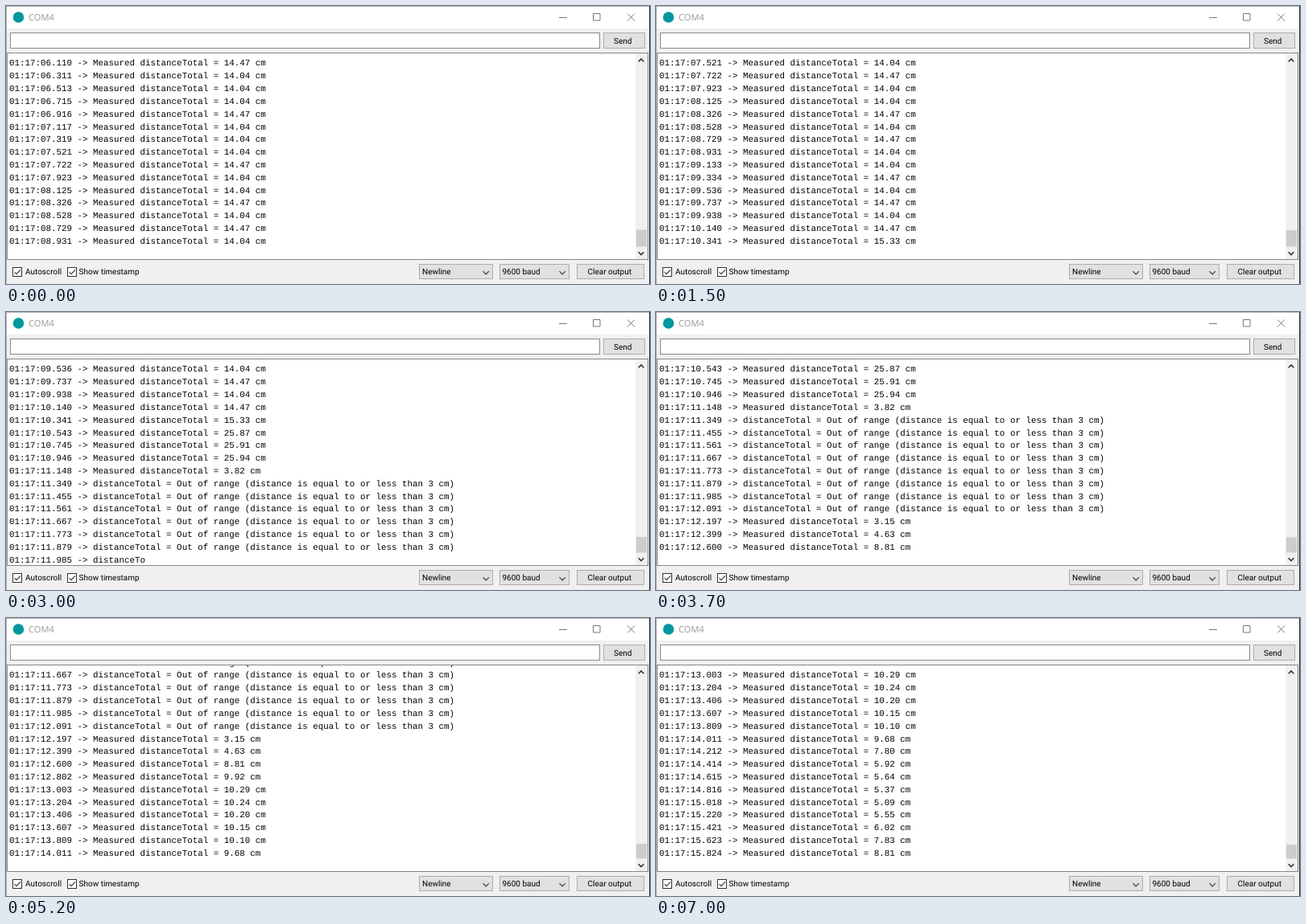
An HTML page that plays this animation: 800 px wide and 346 px high, repeating every 7.1 s.

```html
<!DOCTYPE html>
<html lang="en">
<head>
<meta charset="utf-8">
<title>Serial monitor</title>
<style>
  html, body { margin: 0; width: 100%; height: 100%; overflow: hidden; background: #f0f0f0; }
  svg { display: block; }
  text { font: 10px Roboto, "Noto Sans", sans-serif; fill: #000; text-rendering: geometricPrecision; white-space: pre; }
  #log text { font: 10.85px "Liberation Mono", "Courier New", monospace; }
  .title { font: 11.1px "Open Sans", sans-serif; fill: #999; }
  .button { fill: #e1e1e1; stroke: #adadad; }
  .box { fill: #fff; stroke: #333; }
  .icon { fill: none; stroke: #333; stroke-width: 1.1; }
</style>
</head>
<body>
<svg width="800" height="346" viewBox="0 0 800 346">
  <clipPath id="view"><rect x="2" y="59" width="780" height="256"/></clipPath>
  <rect width="800" height="346" fill="#f0f0f0"/>

  <rect width="800" height="28" fill="#fff"/>
  <circle cx="15.5" cy="14" r="6.8" fill="#00979d"/>
  <text class="title" x="28" y="18">COM4</text>
  <path class="icon" style="stroke:#777;stroke-width:1" d="M687 14.5H697M729.5 9.5h8.5v8.5h-8.5zM772 9.5l9 9m0-9l-9 9"/>

  <rect x="5.5" y="33.5" width="732" height="19" fill="#fff" stroke="#8a8a8a"/>
  <rect class="button" x="742.5" y="33.5" width="51" height="19"/>
  <text x="755" y="46.7">Send</text>

  <rect x="1.5" y="58.5" width="796" height="257" fill="#fff" stroke="#828790"/>
  <g id="log" clip-path="url(#view)"></g>
  <rect x="782" y="59" width="15" height="256" fill="#f0f0f0"/>
  <rect id="thumb" x="783" width="13" fill="#cdcdcd"/>
  <path class="icon" style="stroke-width:1.6" d="M785.7 69.3l3.3-3.3 3.3 3.3M785.7 306.2l3.3 3.3 3.3-3.3"/>

  <rect class="box" x="8.5" y="325.5" width="11" height="11"/>
  <rect class="box" x="76.5" y="325.5" width="11" height="11"/>
  <path class="icon" d="M10.5 331l2.5 2.7 5-5.4M78.5 331l2.5 2.7 5-5.4"/>
  <text x="24" y="334.3">Autoscroll</text>
  <text x="90.5" y="334.3">Show timestamp</text>

  <rect class="button" x="513.5" y="321.5" width="91" height="18"/>
  <rect class="button" x="613.5" y="321.5" width="86" height="18"/>
  <rect class="button" x="709.5" y="321.5" width="83" height="18"/>
  <text x="517" y="334.3">Newline</text>
  <text x="616.5" y="334.3">9600 baud</text>
  <text x="722.5" y="334.3">Clear output</text>
  <path class="icon" d="M592.5 330.2l3.7 3.7 3.7-3.7M687.5 330.2l3.7 3.7 3.7-3.7"/>

  <path d="M0 .5H800M.5 0V346" stroke="#b4b4b4"/>
  <rect x="799" width="1" height="346" fill="#2b2b2b"/>
</svg>
<script>
const LOOP = 7100, STEP = 100, CLOCK_START = 8996;
const CHARS_PER_MS = 0.96; // 9600 baud
const ROWS = 17, PITCH = 15.82, LAST_BASELINE = 295.9;
const THUMB_BOTTOM = 299.5;

const READINGS = 53, FIRST_AT = 6110, MEASURED_GAP = 201.5, NEAR_GAP = 106, MIN_CM = 3;

// How the obstacle moves: [reading, cm], straight lines between.
const path = [
  [20, 14.47], [21, 15.33], [22, 25.87], [24, 25.94], [25, 3.82], [26, 2.9], [33, 2.9],
  [34, 3.15], [35, 4.63], [36, 8.81], [37, 9.92], [38, 10.29], [42, 10.1], [43, 9.68],
  [45, 5.92], [48, 5.09], [50, 6.02], [51, 7.83], [52, 8.81],
];

// At rest the echo flips up once per beat, and the beats come faster.
const beat = i => Math.floor(0.162 * i ** 1.25 + 0.1);
const resting = i => i === 0 || beat(i) > beat(i - 1) ? 14.47 : 14.04;

function distance(i) {
  if (i < path[0][0]) return resting(i);
  const k = Math.max(1, path.findIndex(([index]) => index >= i));
  const [i0, cm0] = path[k - 1], [i1, cm1] = path[k];
  return cm0 + (cm1 - cm0) * (i - i0) / (i1 - i0);
}

const lines = [];
for (let i = 0, at = FIRST_AT; i < READINGS; i++) {
  const cm = distance(i), near = cm <= MIN_CM;
  lines.push({
    at,
    prefix: `01:17:${(at / 1000).toFixed(3).padStart(6, "0")} -> `,
    message: near ? `distanceTotal = Out of range (distance is equal to or less than ${MIN_CM} cm)`
                  : `Measured distanceTotal = ${cm.toFixed(2)} cm`,
  });
  at += near ? NEAR_GAP : MEASURED_GAP;
}

const log = document.getElementById("log");
const thumb = document.getElementById("thumb");
const rows = Array.from({ length: ROWS }, (_, i) => {
  const row = document.createElementNS("http://www.w3.org/2000/svg", "text");
  row.setAttribute("x", 3.9);
  row.setAttribute("y", LAST_BASELINE + (i - ROWS + 2) * PITCH);
  return log.appendChild(row);
});

function draw(time) {
  const clock = CLOCK_START + time;
  const complete = [];
  let partial = "";
  for (const { at, prefix, message } of lines) {
    const sent = Math.floor((clock - at) * CHARS_PER_MS);
    if (sent >= message.length + 2) complete.push(prefix + message);
    else if (sent > 0) partial = prefix + message.slice(0, sent);
  }
  // The final row is the line still arriving.
  const first = complete.length - ROWS + 1;
  rows.forEach((row, i) => {
    row.textContent = i === ROWS - 1 ? partial : complete[first + i] || "";
  });
  const top = 278.5 + 3.5 * time / LOOP;
  thumb.setAttribute("y", top);
  thumb.setAttribute("height", THUMB_BOTTOM - top);
}

function tick(now) {
  draw(Math.floor(now % LOOP / STEP) * STEP);
  requestAnimationFrame(tick);
}
tick(performance.now());
</script>
</body>
</html>
```
